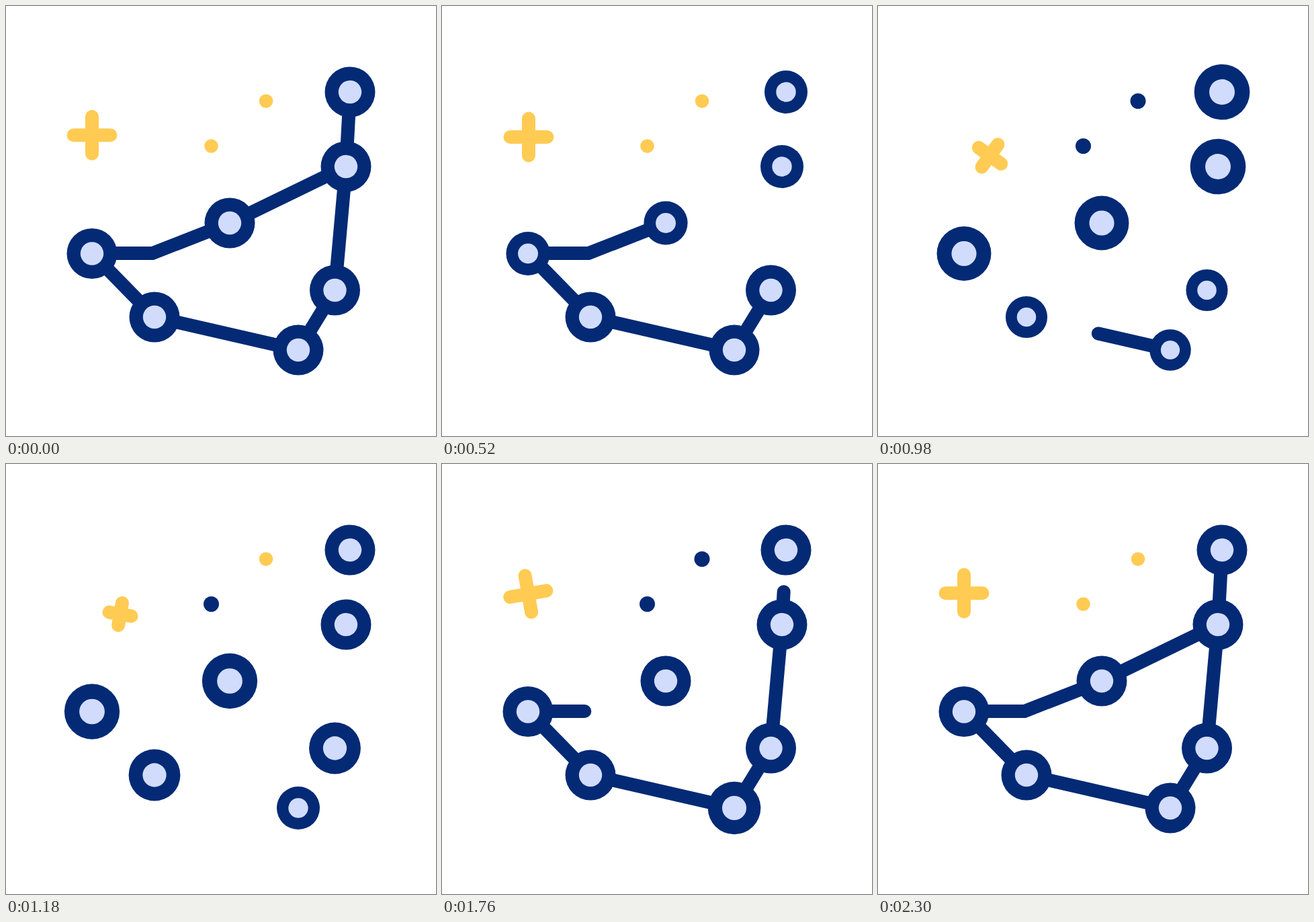
An HTML page for the animation above (2.4 s loop, 640 by 640 pixels).

```html
<!DOCTYPE html>
<html lang="en">
<head>
<meta charset="utf-8">
<title>Constellation</title>
<style>
  html, body { margin: 0; width: 100%; height: 100%; overflow: hidden; background: #fff; }
  svg { display: block; width: 100vw; height: 100vh; }
  .line { fill: none; stroke: #042a75; stroke-width: 20; stroke-linecap: round; }
  .plus { fill: none; stroke: #ffcb53; stroke-width: 20; stroke-linecap: round; }
  .ring { fill: #042a75; }
  .core { fill: #d1dcfd; }
</style>
</head>
<body>
<svg viewBox="0 0 640 640">
  <circle id="dotL" cx="305.5" cy="208.5"/>
  <circle id="dotR" cx="387" cy="141.5"/>
  <path id="plus" class="plus"/>
  <path id="right" class="line" pathLength="1" d="M435 512 489.5 423 506 239 512 128"/>
  <path id="left" class="line" pathLength="1" d="M435 512 221 463 128 368H218L333 323 506 239"/>
  <g id="nodes"></g>
</svg>
<script>
const LOOP = 2400;
const $ = id => document.getElementById(id);
const set = (el, attrs) => { for (const k in attrs) el.setAttribute(k, attrs[k]); };

const clamp = x => Math.min(1, Math.max(0, x));
const span = (t, a, b) => clamp((t - a) / (b - a));
const ease = (t, a, b) => { const s = span(t, a, b); return s * s * (3 - 2 * s); };

// Pulse times: start, smallest, largest, settled
const early = [80, 380, 920, 1180];
const second = [340, 640, 1080, 1440];
const third = [580, 900, 1340, 1720];
const last = [740, 1040, 1580, 1900];

const nodes = [
  [512, 128, early], [506, 239, early],
  [333, 323, second], [128, 368.5, second],
  [221, 463, third], [489.5, 423, third],
  [435, 512, last]
].map(([x, y, times]) => {
  const circle = (cls, r) => `<circle class="${cls}" r="${r}"/>`;
  $('nodes').insertAdjacentHTML('beforeend', `<g>${circle('ring', 37.5)}${circle('core', 17.2)}</g>`);
  return { x, y, times, el: $('nodes').lastElementChild };
});

const pulse = (t, [a, b, c, d]) =>
  1 - 0.2 * ease(t, a, b) + 0.32 * ease(t, b, c) - 0.12 * ease(t, c, d);

// Lines withdraw towards the lowest star, then grow out of it again
function drawLine(id, t, out, back) {
  const shown = Math.max(1 - ease(t, ...out), ease(t, ...back));
  set($(id), { 'stroke-dasharray': `${shown} 2` });
}

function drawDot(id, t, delay) {
  const phase = t - delay;
  const dark = (phase >= 600 && phase < 1160) || (phase >= 1700 && phase < 2260);
  set($(id), { r: dark ? 11.5 : 10.3, fill: dark ? '#042a75' : '#ffcb53' });
}

function drawPlus(t) {
  const u = ease(t, 430, 1070) - ease(t, 1220, 1810);
  const x = 128 + 2 * u * (1 - u) * 8 + u * u * 42;
  const y = 192.3 + 2 * u * (1 - u) * 25.5 + u * u * 31.2;
  const away = 1 - span(t, 1210, 2060);
  const turn = -80 * ease(t, 670, 1170) * (t < 1210 ? 1 : away * away);
  const arm = 27.5 - 10.7 * (ease(t, 740, 1140) - ease(t, 1180, 1760));
  set($('plus'), {
    d: `M${-arm} 0H${arm}M0 ${-arm}V${arm}`,
    transform: `translate(${x} ${y}) rotate(${turn})`
  });
}

function render(t) {
  drawLine('right', t, [0, 800], [1108, 1978]);
  drawLine('left', t, [160, 1240], [1100, 2300]);
  for (const { x, y, times, el } of nodes) {
    set(el, { transform: `translate(${x} ${y}) scale(${pulse(t, times)})` });
  }
  drawDot('dotR', t, 0);
  drawDot('dotL', t, 40);
  drawPlus(t);
}

const start = performance.now();
function tick() {
  render((performance.now() - start) % LOOP);
  requestAnimationFrame(tick);
}
tick();
</script>
</body>
</html>
```
